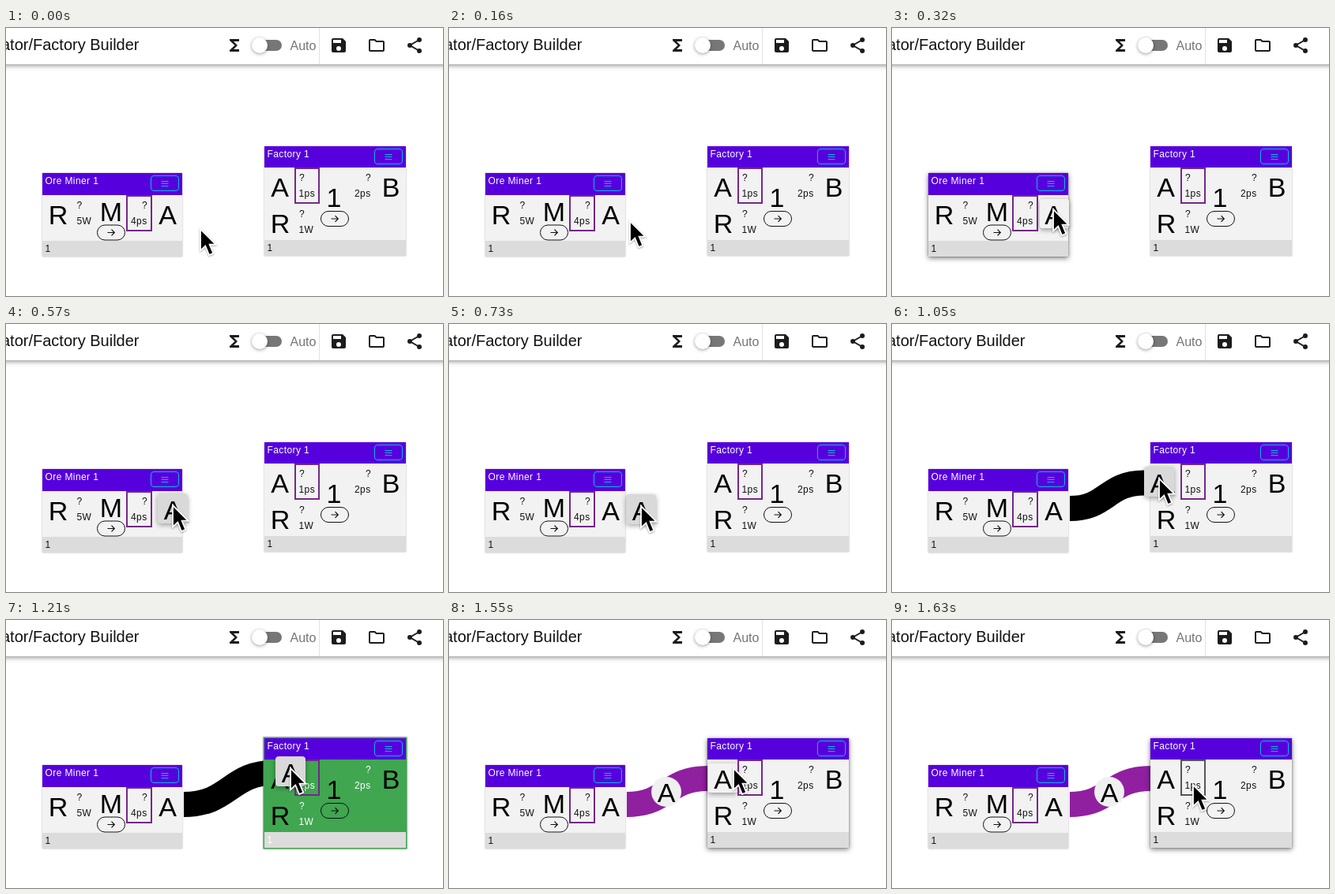
An HTML page that plays this animation: 553x340 px, repeating every 1710 ms.

```html
<!DOCTYPE html>
<html lang="en">
<head>
<meta charset="utf-8">
<title>Factory Builder</title>
<style>
  html, body { margin: 0; width: 100%; height: 100%; overflow: hidden; background: #fff; }
  svg { display: block; width: 553px; height: 340px; }
  text { font-family: "Liberation Sans", Arial, sans-serif; fill: #111; }
  .big { font-size: 34px; text-anchor: middle; fill: #000; }
  .small { font-size: 12px; letter-spacing: .4px; }
  .name { fill: #fff; }
  .bar { filter: drop-shadow(0 2px 2px rgba(0,0,0,.28)) drop-shadow(0 1px 4px rgba(0,0,0,.16)); }
  .body { fill: #f2f2f2; }
  .frame { fill: #f2f2f2; filter: drop-shadow(0 0 1px rgba(0,0,0,.3)); }
  .menu { fill: none; stroke: #12b5dc; }
  .pill { fill: none; stroke: #111; }
  .slot { fill: none; stroke: #752886; stroke-width: 2; }
  .tile { fill: #f2f2f2; filter: drop-shadow(0 2px 3px rgba(0,0,0,.4)); visibility: hidden; }
  .hover .frame { filter: drop-shadow(0 0 1px rgba(0,0,0,.3)) drop-shadow(0 2px 3px rgba(0,0,0,.5)); }
  .raised .tile { visibility: visible; }
  .lit .slot { stroke: #555; }
  .drop .body { fill: #40a650; }
  .drop .frame { fill: #40a650; stroke: #40a650; stroke-width: 3; }
  .drop .small { fill: #fff; }
  .ghost { fill: #d9d9d9; filter: drop-shadow(0 2px 3px rgba(0,0,0,.35)); }
  #wire { fill: none; stroke-width: 32; }
</style>
</head>
<body>
<svg viewBox="0 0 553 340">
  <g class="bar"><rect x="-10" y="-10" width="573" height="56" fill="#fff"/></g>
  <text x="168.5" y="28" font-size="20" text-anchor="end">ator/Factory Builder</text>
  <path d="M295 14H283v2l6.5 6-6.5 6v2h12v-3h-7l5-5-5-5h7z" fill="#1c1c1c"/>
  <rect x="315" y="15" width="34" height="14" rx="7" fill="#777"/>
  <circle cx="321" cy="22" r="10" fill="#fff" style="filter:drop-shadow(0 1px 2px rgba(0,0,0,.4))"/>
  <text x="359.5" y="27.5" font-size="16" style="fill:#757575">Auto</text>
  <path d="M396.5 0V46" stroke="#e2e2e2"/>
  <g fill="#1c1c1c">
    <path d="M414 13h12l4 4v12a2 2 0 0 1-2 2h-14a2 2 0 0 1-2-2v-14a2 2 0 0 1 2-2z"/>
    <path d="M414 15h10v4h-10z" fill="#fff"/>
    <circle cx="421" cy="26" r="3" fill="#fff"/>
    <path d="M460 17v11q0 1 1 1h16q1 0 1-1v-10q0-1-1-1h-8.400l-2-2h-5.600q-1 0-1 1z" fill="none" stroke="#1c1c1c" stroke-width="2"/>
    <path d="M523 15l-12 7 12 7" fill="none" stroke="#1c1c1c" stroke-width="2"/>
    <circle cx="523" cy="15" r="3"/><circle cx="511" cy="22" r="3"/><circle cx="523" cy="29" r="3"/>
  </g>
  <path id="wire"/>
  <g id="badge">
    <circle cx="275" cy="218" r="19" fill="#f0f0f0"/>
    <text class="big" x="275" y="230.500">A</text>
  </g>
  <g id="miner"></g>
  <g id="factory"></g>
  <g id="drag">
    <rect class="ghost" x="-19" y="-15" width="38" height="38" rx="4"/>
    <text class="big" x="0" y="17.500">A</text>
  </g>
  <path id="cursor" d="M0 0V27.500L6.300 21.500 11 33 16.300 30.800 11.600 19.600H19.500Z" fill="#000" stroke="#fff" stroke-width="1.800" style="filter:drop-shadow(0 1px 1px rgba(0,0,0,.35))"/>
</svg>
<script>
const el = id => document.getElementById(id);
const big = (s, x, y) => `<text class="big" x="${x}" y="${y}">${s}</text>`;
const small = (s, x, y, cls = '') => `<text class="small ${cls}" x="${x}" y="${y}">${s}</text>`;
const slot = (x, y, w, h) => `<rect class="slot" x="${x}" y="${y}" width="${w}" height="${h}"/>`;
const tile = (x, y) => `<rect class="tile" x="${x}" y="${y}" width="37" height="37" rx="3"/>`;
const pill = (x, y) => `<g class="pill" transform="translate(${x} ${y})">
  <rect x="-17.500" y="-9.500" width="35" height="19" rx="9.500"/>
  <path d="M-4.500 0H4M.5-3.800L4.300 0 .5 3.800" stroke-width="1.200"/></g>`;

function card(name, x, y, w, head, foot, parts) {
  const right = x + w, end = foot + 20;
  return `<rect class="frame" x="${x}" y="${y}" width="${w}" height="${end - y}"/>
    <rect class="body" x="${x}" y="${y}" width="${w}" height="${foot - y}"/>
    <rect x="${x}" y="${y}" width="${w}" height="${head}" fill="#5600dd"/>
    <rect x="${x}" y="${foot}" width="${w}" height="20" fill="#dcdcdc"/>
    ${small(name, x + 3.5, y + 14, 'name')}
    <g class="menu" transform="translate(${right - 40} ${y + 3})">
      <rect x=".5" y=".5" width="35" height="19" rx="3.500"/>
      <path d="M13.500 7.500h9M13.500 10.500h9M13.500 13.500h9"/></g>
    ${small('1', x + 3.5, foot + 14)}` + parts.join('');
}

el('miner').innerHTML = card('Ore Miner 1', 46, 184, 177, 28, 270, [
  tile(187, 217), big('R', 66, 249), small('?', 89.5, 229), small('5W', 89.5, 249),
  big('M', 133, 245), pill(133, 259.5), slot(153, 213, 31, 44),
  small('?', 172, 229), small('4ps', 158, 249), big('A', 204.5, 249)
]);
el('factory').innerHTML = card('Factory 1', 327, 150, 179, 27, 269, [
  tile(328, 182), big('A', 346.5, 214), slot(366, 178, 30, 44),
  small('?', 371, 194), small('1ps', 370.5, 214), big('1', 415, 226.5), pill(416, 242),
  small('?', 455, 194), small('2ps', 441, 214), big('B', 487, 214),
  big('R', 347, 260), small('?', 371, 240), small('1W', 370.5, 260)
]);

// Cursor tip: [time, x, y], held until the next entry.
const path = [
  [0, 246, 255], [80, 241, 252], [160, 229, 245], [240, 213, 236], [320, 204, 230],
  [570, 211, 230], [650, 224, 231], [730, 243, 231], [810, 268, 226], [890, 295, 216],
  [970, 319, 205], [1050, 338, 196], [1130, 352, 191], [1210, 360, 188], [1630, 381, 209]
];
const LOOP = 1710;
const start = performance.now();

function setWire(x, y, color) {
  const x0 = 225, y0 = 234, mid = (x0 + x) / 2;
  const wire = el('wire');
  wire.setAttribute('d', x > x0 ? `M${x0} ${y0}C${mid} ${y0} ${mid} ${y} ${x} ${y}` : '');
  wire.setAttribute('stroke', color);
}

function draw(t) {
  const [, x, y] = path.findLast(p => p[0] <= t);
  const between = (a, b) => t >= a && t < b;
  const dragging = between(570, 1550), linked = t >= 1550;
  const toggle = (id, cls, on) => el(id).classList.toggle(cls, on);

  for (const id of ['cursor', 'drag']) el(id).setAttribute('transform', `translate(${x} ${y})`);
  el('drag').style.display = dragging ? '' : 'none';
  el('badge').style.display = linked ? '' : 'none';
  toggle('miner', 'hover', between(240, 570));
  toggle('miner', 'raised', between(240, 570));
  toggle('factory', 'drop', between(1130, 1550));
  toggle('factory', 'hover', linked);
  toggle('factory', 'raised', between(1550, 1630));
  toggle('factory', 'lit', t >= 1630);

  if (linked) setWire(327, 201, '#9020a0');
  else setWire(dragging ? x - 19 : 0, y + 5.5, '#000');
}

function tick(now) {
  draw(Math.max(0, now - start) % LOOP);
  requestAnimationFrame(tick);
}
draw(0);
requestAnimationFrame(tick);
</script>
</body>
</html>
```
